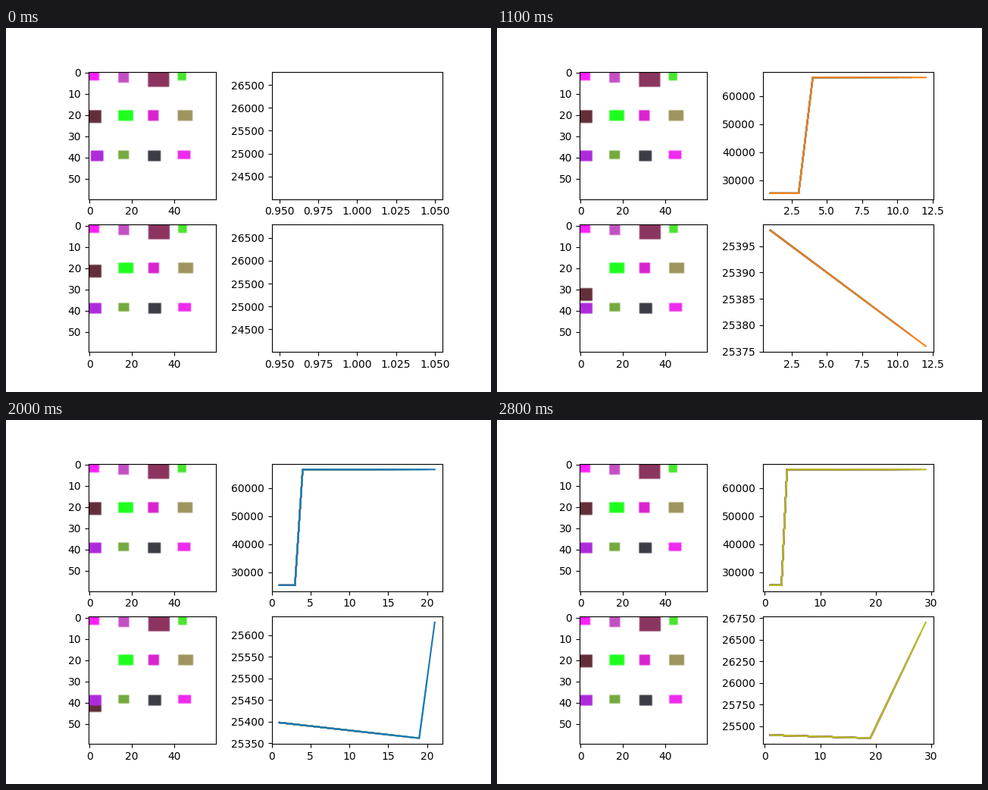
Write a matplotlib script that moves like this. It is 640 px wide and 480 px high and loops after 2.9 s.

```python
import matplotlib.pyplot as plt
import numpy as np
from matplotlib.animation import FuncAnimation

STEPS = 29
GRID = 60

# x, y, width, height, colour; drawn in order
BLOCKS = [
    (0, 0, 5, 4, "#ff20ff"),
    (14, 0, 5, 5, "#c450c4"),
    (28, 0, 10, 7, "#8b345f"),
    (42, 0, 4, 4, "#48e62c"),
    (0, 18, 6, 6, "#612e3a"),
    (14, 18, 7, 5, "#1eff1e"),
    (28, 18, 5, 5, "#da22d0"),
    (42, 18, 7, 5, "#9e945e"),
    (0, 37, 6, 5, "#ae2ada"),
    (14, 37, 5, 4, "#74aa3e"),
    (28, 37, 6, 5, "#3c3c46"),
    (42, 37, 6, 4, "#ee2aee"),
]
BROWN, PURPLE = 4, 8


def layout(moved, dx=0, dy=0):
    """Paint all blocks on a white grid, with one of them shifted."""
    img = np.full((GRID, GRID, 3), 255, np.uint8)
    for i, (x, y, w, h, color) in enumerate(BLOCKS):
        if i == moved:
            x, y = x + dx, y + dy
        rgb = [int(color[k:k + 2], 16) for k in (1, 3, 5)]
        img[y:y + h, x:x + w] = rgb
    return img


steps = np.arange(1, STEPS + 1)
falling = 25400.0 - 2 * steps
cost_x = np.where(steps < 4, falling, 66570.0)
cost_y = np.where(steps < 20, falling, 25362 + 133.8 * (steps - 19))

fig, ((ax_top, ax_cost_x), (ax_low, ax_cost_y)) = plt.subplots(
    2, 2, figsize=(6.4, 4.8), dpi=100)
img_top = ax_top.imshow(layout(PURPLE))
img_low = ax_low.imshow(layout(BROWN))


def draw_history(ax, cost, n):
    # each step adds one more line over the earlier ones
    ax.clear()
    for k in range(1, n + 2):
        ax.plot(steps[:k], cost[:k])


def update(n):
    img_top.set_data(layout(PURPLE, dx=n + 1 if n < 3 else 0))
    img_low.set_data(layout(BROWN, dy=(n + 1) % STEPS))
    draw_history(ax_cost_x, cost_x, n)
    draw_history(ax_cost_y, cost_y, n)
    return []


anim = FuncAnimation(fig, update, frames=STEPS, interval=100, repeat=True)
plt.show()
```
